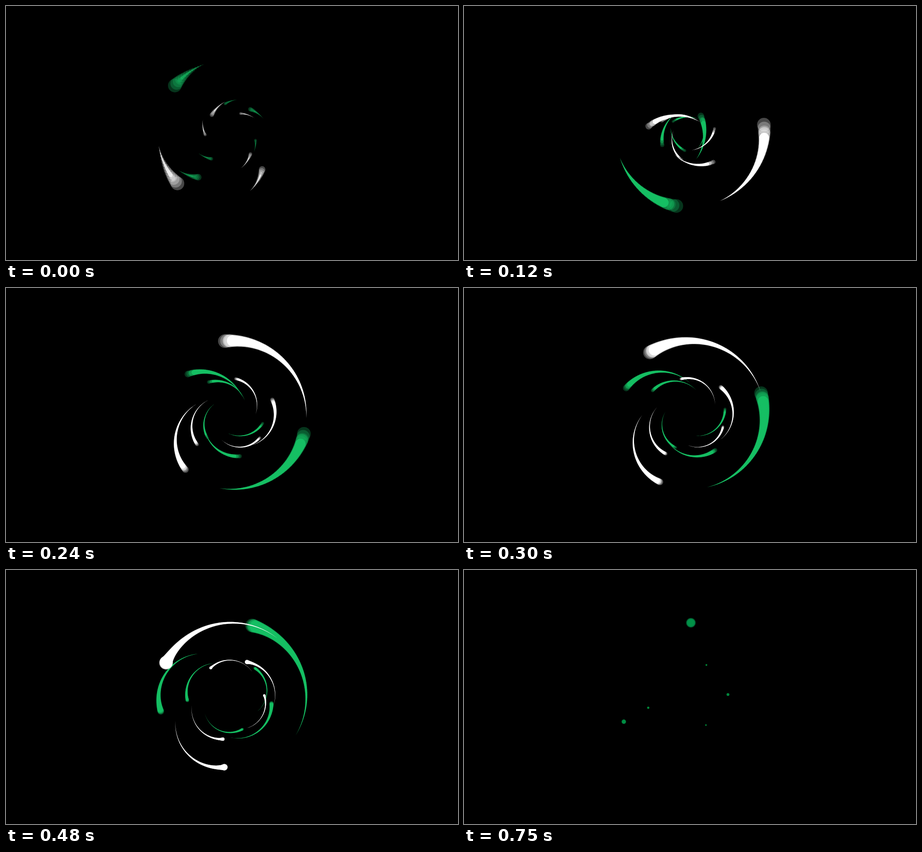
Animation, 997 px wide and 561 px high, one loop 780 ms. Source, as an HTML page with a canvas:

```html
<!DOCTYPE html>
<html lang="en">
<head>
<meta charset="utf-8">
<title>Swirl</title>
<style>
html, body { margin: 0; height: 100%; overflow: hidden; background: #000; }
canvas { display: block; }
</style>
</head>
<body>
<canvas id="stage" width="997" height="561"></canvas>
<script>
const ctx = document.getElementById("stage").getContext("2d");
const WIDTH = 997, HEIGHT = 561, LOOP = 780, STEP = 30;

// Angles are in degrees, counter-clockwise; the centre is given from the middle of the stage
const orbits = [
  { radius: 164, distance: 0, direction: 0, end: 89.3 },
  { radius: 97, distance: 65, direction: 181, end: 213.4 },
  { radius: 74.5, distance: 21, direction: -53, end: 17.3 },
  { radius: 66.5, distance: 35, direction: 166, end: 209 },
  { radius: 60, distance: 22, direction: 39, end: 71.5 },
  { radius: 57, distance: 22, direction: -103, end: -45.3 }
];

// Both groups share the orbits; the second is turned and runs faster
const groups = [
  { color: "#17bf63", turn: 0, delay: 17, stretch: 1.32 },
  { color: "#fff", turn: 63.5, delay: 0, stretch: 1 }
];

const clamp = v => Math.min(1, Math.max(0, v));
const remaining = t => 290 * Math.max(0, 1 - t / 510) ** 2.55;

function polar(x, y, distance, degrees) {
  const a = degrees * Math.PI / 180;
  return [x + distance * Math.cos(a), y - distance * Math.sin(a)];
}

function drawTrail({ radius, distance, direction, end }, turn, t) {
  const [cx, cy] = polar(WIDTH / 2, HEIGHT / 2, distance, direction + turn);
  const lag = 22 + 0.3 * t + 0.00061 * t * t;
  const gap = Math.min(2.8, 1.5 + 0.011 * t) / lag;
  const keep = 1 - clamp((t - 505) / 50);
  const headSize = 2.6 + (radius - 56) * 0.115;
  const size = headSize * clamp(1 - (t - 505) * 0.0054);
  const fade = Math.min(1, Math.exp((520 - t) / 45));

  // u runs from 0 at the head to 1 at the tip of the tail
  const taper = u => (1 - u) ** 1.2;
  const pointAt = (u, offset) =>
    polar(cx, cy, radius + offset, end + turn - remaining(t - u * lag * keep));
  const addCircle = (u, r) => {
    const [x, y] = pointAt(u, 0);
    ctx.moveTo(x + r, y);
    ctx.arc(x, y, r, 0, 2 * Math.PI);
  };

  function drawBody(start, width, alpha) {
    const parts = 48;
    ctx.globalAlpha = alpha;
    ctx.beginPath();
    for (const side of [1, -1]) {
      for (let i = 0; i <= parts; i++) {
        const f = (side > 0 ? i : parts - i) / parts;
        const u = start + (1 - start) * f;
        ctx.lineTo(...pointAt(u, side * width * taper(u)));
      }
    }
    ctx.closePath();
    addCircle(start, width * taper(start));
    ctx.fill();
  }

  // Soft edge, then the solid core
  const growth = clamp(0.45 + t / 110);
  const strength = fade * clamp(0.7 + t / 100);
  drawBody(2.4 * gap * keep, size * growth, 0.45 * strength);
  drawBody(3.7 * gap * keep, size * growth * 0.88, strength);

  // Translucent leading echoes
  ctx.globalAlpha = 0.28 * fade ** 3;
  for (let u = 0; u < 1; u += gap) {
    ctx.beginPath();
    addCircle(u, size * taper(u));
    ctx.fill();
  }
}

function render(now) {
  const time = Math.floor(now % LOOP / STEP) * STEP;
  ctx.globalAlpha = 1;
  ctx.fillStyle = "#000";
  ctx.fillRect(0, 0, WIDTH, HEIGHT);
  for (const { color, turn, delay, stretch } of groups) {
    ctx.fillStyle = color;
    for (const orbit of orbits) drawTrail(orbit, turn, (time - delay) / stretch);
  }
}

const began = performance.now();
function tick() {
  render(performance.now() - began);
  requestAnimationFrame(tick);
}
tick();
</script>
</body>
</html>
```
